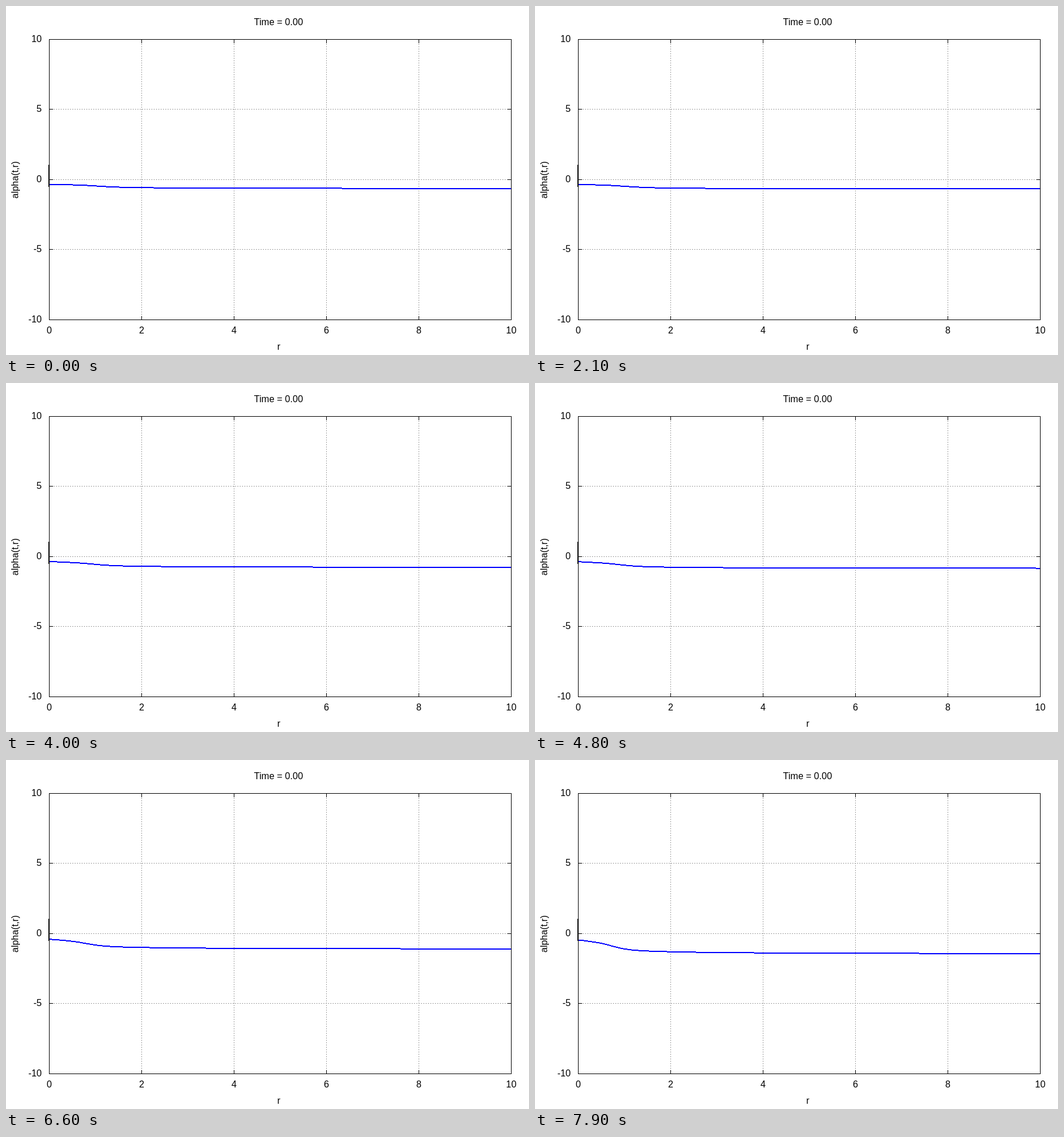
Animation, 900 px wide and 600 px high, one loop 8 s. Source, as an HTML page:

```html
<!DOCTYPE html>
<html lang="en">
<head>
<meta charset="utf-8">
<title>alpha(t,r)</title>
<style>
  html, body { margin: 0; width: 100%; height: 100%; overflow: hidden; background: #fff; }
  svg { display: block; width: 900px; height: 600px; }
  text { font: 16px "Liberation Sans", Arial, sans-serif; fill: #000; }
  path, rect { shape-rendering: crispEdges; fill: none; }
  #grid { stroke: #a0a0a0; stroke-dasharray: 2 2; }
  #frame { stroke: #000; }
  #curve { fill: #00f; }
  #initial { fill: #000; }
  .mid { text-anchor: middle; }
  .end { text-anchor: end; }
</style>
</head>
<body>
<svg viewBox="0 0 900 600">
  <path id="grid"/>
  <path id="curve"/>
  <path id="frame"/>
  <rect id="initial" x="73" y="273" width="2" height="38"/>
  <g id="labels">
    <text class="mid" x="469" y="33">Time = 0.00</text>
    <text class="mid" x="469.5" y="591">r</text>
    <text class="mid" transform="translate(21 299) rotate(-90)">alpha(t,r)</text>
  </g>
</svg>
<script>
const LEFT = 74, RIGHT = 869, TOP = 57, BOTTOM = 539;
const LOOP = 8000, STEP = 100, UNIT = (RIGHT - LEFT) / 10;
const $ = id => document.getElementById(id);

function label(cls, x, y, value) {
  const el = document.createElementNS($('grid').namespaceURI, 'text');
  el.setAttribute('class', cls);
  el.setAttribute('x', x);
  el.setAttribute('y', y);
  el.textContent = value;
  $('labels').append(el);
}

function drawAxes() {
  let grid = '', frame = `M${LEFT + .5} ${TOP + .5}H${RIGHT + .5}V${BOTTOM + .5}H${LEFT + .5}Z`;
  for (let i = 0; i <= 5; i++) {
    const x = LEFT + 159 * i;
    label('mid', x + .5, 563, 2 * i);
    if (i % 5 === 0) continue;
    grid += `M${x + .5} ${BOTTOM}V${TOP}`;
    frame += `M${x + .5} ${TOP}v7M${x + .5} ${BOTTOM + 1}v-7`;
  }
  for (let i = 0; i <= 4; i++) {
    const y = Math.floor(TOP + 120.5 * i);
    label('end', 61.5, y + 5, 10 - 5 * i);
    if (i % 4 === 0) continue;
    grid += `M${LEFT} ${y + .5}H${RIGHT}`;
    frame += `M${LEFT} ${y + .5}h7M${RIGHT + 1} ${y + .5}h-7`;
  }
  $('grid').setAttribute('d', grid);
  $('frame').setAttribute('d', frame);
}

// Smooth interpolation through unevenly spaced keys.
function spline(ts, vs) {
  const last = ts.length - 1;
  const slope = i => (vs[i + 1] - vs[i]) / (ts[i + 1] - ts[i]);
  const tangents = ts.map((t, i) => {
    const j = Math.min(Math.max(i, 1), last - 1);
    const bend = (slope(j) - slope(j - 1)) / (ts[j + 1] - ts[j - 1]);
    return slope(j - 1) + bend * (2 * t - ts[j - 1] - ts[j]);
  });
  return t => {
    let i = 0;
    while (i < last - 1 && t > ts[i + 1]) i++;
    const h = ts[i + 1] - ts[i], u = (t - ts[i]) / h, v = 1 - u;
    return v * v * ((1 + 2 * u) * vs[i] + u * h * tangents[i])
         + u * u * ((1 + 2 * v) * vs[i + 1] - v * h * tangents[i + 1]);
  };
}

const keys = [100, 2100, 3200, 4800, 5900, 6600, 7900];
const centre = spline(keys, [306.88, 306.92, 307.03, 307.42, 307.98, 308.38, 309.75]);
const limit = spline(keys, [314.07, 314.86, 316.02, 318.97, 322.35, 325.31, 333.57]);
const tail = spline(keys, [3.62, 3.8, 4.11, 4.66, 5.5, 6.17, 7.9]);

// Height in pixels: a flat core that approaches its limit as 1/r.
function profile(t) {
  const far = limit(t), depth = far - centre(t), width = tail(t) / depth;
  const age = Math.min(t / 4500, 1);
  const bump = .335 - .09 * age, spread = 2.1 + .35 * age;
  return r => {
    const q = (r / width) ** 2;
    return far - depth * (1 / Math.sqrt(1 + q) + bump * q * Math.exp(-q / spread));
  };
}

function drawCurve(t) {
  const height = profile(t);
  const row = x => Math.round(height((x - LEFT) / UNIT));
  let d = '';
  for (let x = LEFT + 1; x < RIGHT;) {
    const start = x, y = row(x);
    while (x < RIGHT && row(x) === y) x++;
    d += `M${start} ${y - 1}H${x}v2H${start}Z`;
  }
  $('curve').setAttribute('d', d);
}

let shown = -1;
function tick() {
  const t = Math.max(STEP, Math.floor(performance.now() % LOOP / STEP) * STEP);
  if (t !== shown) drawCurve(shown = t);
  requestAnimationFrame(tick);
}

drawAxes();
tick();
</script>
</body>
</html>
```
